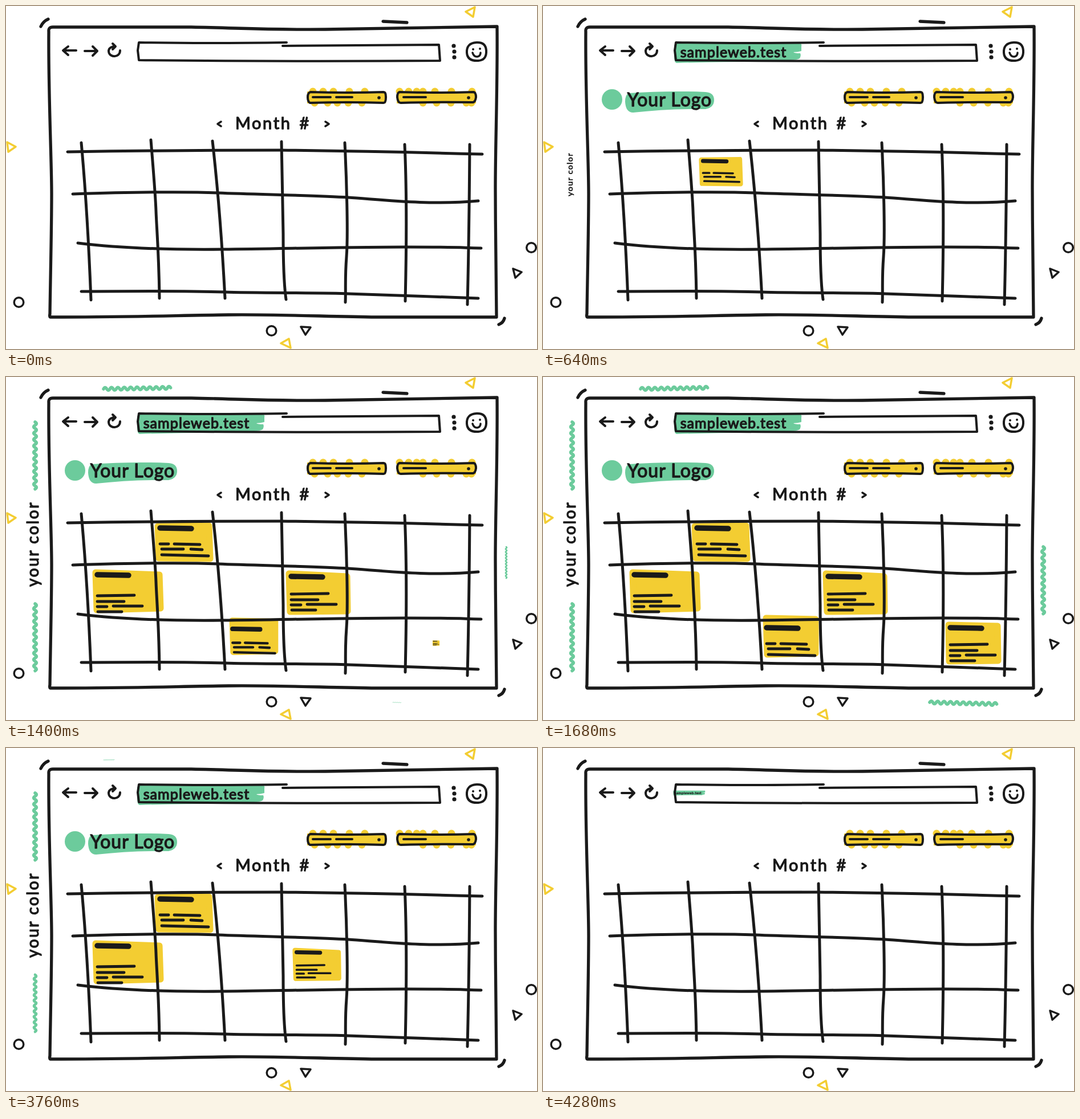
These frames come from a looping animation (931x602 px, 4320 ms). An HTML page:

```html
<!DOCTYPE html>
<html lang="en">
<head>
<meta charset="utf-8">
<title>Calendar sketch</title>
<style>
  html, body { margin: 0; width: 100%; height: 100%; overflow: hidden; background: #fff; }
  svg { display: block; width: 100%; height: 100%; }
  path, circle { fill: none; stroke: #1a1a1a; stroke-width: 4; stroke-linecap: round; stroke-linejoin: round; }
  text { font-family: Lato, "Open Sans", sans-serif; fill: #1a1a1a; stroke: #1a1a1a; stroke-width: 1.3; stroke-linejoin: round; }
  .mid { text-anchor: middle; }
  .green { fill: #6ccb9c; stroke: none; }
  .yellow { fill: #f3cd32; stroke: none; }
  .paper { fill: #f3cd32; stroke: #f3cd32; stroke-width: 11; }
  .wave { stroke: #6ccb9c; stroke-width: 5.5; }
  .head { stroke-width: 9.4; }
  .bars { stroke-width: 4.9; }
  .frame { stroke-width: 5.3; }
  .grid { stroke-width: 5; }
  .thin { stroke-width: 3.5; }
  .gold { stroke: #f3cd32; }
  .dot { fill: #1a1a1a; stroke: none; }
</style>
</head>
<body>
<svg viewBox="0 0 931 602">
  <g id="moving">
    <g data-start="0" data-origin="228 77.7">
      <path class="green" d="M230 69L232 66H451Q454 66 453 71V79Q447 81 439 81Q441 83 451 83Q453 87 450 92Q445 95 434 95V98Q330 97 234 100Q230 99 230 88Z"/>
      <text class="mid" x="334" y="90" font-size="25" letter-spacing="1.1">sampleweb.test</text>
    </g>
    <g data-start="200" data-origin="103 164">
      <circle class="green" cx="121" cy="164" r="18"/>
      <path class="green" d="M150 153Q220 148 285 151Q300 152 300 165Q300 178 285 181Q220 180 158 187Q145 187 144 168Q144 156 150 153Z"/>
      <text class="mid" x="222" y="176" font-size="32" letter-spacing="1">Your Logo</text>
    </g>
    <g data-start="477" data-origin="46 298">
      <text class="mid" transform="translate(57 293) rotate(-90)" font-size="28" letter-spacing="2.6">your color</text>
    </g>
  </g>

  <path class="frame" d="M75 45Q74 37 82 37H325C420 39 470 42 560 41S740 38 861 36C862 140 858 240 858 320S860 490 860 546H650C560 545 480 541 390 542S220 546 78 546Q76 546 77 540C78 470 80 390 80 330S74 150 75 45Z"/>
  <path class="frame" d="M61 36Q65 27 74 23M874 548Q872 556 864 559M661 27L703 29"/>
  <path d="M123 78H101M109 71L100 78L109 86M138 79H160M152 71L160 79L152 87"/>
  <path d="M200 78C200 92 179 91 180 78C181 73 186 71 192 71M187 66L192 71L187 76"/>
  <path d="M492 64Q350 66 233 64L231 78L233 95Q500 98 761 96L759 68Q620 69 485 70"/>
  <path d="M825 64Q841 63 842 78Q843 95 828 96Q809 97 808 82Q807 65 825 64Z"/>
  <path class="thin" d="M818 82Q820 89 826 89Q832 88 832 82"/>

  <g id="bumps"></g>
  <path class="yellow" d="M528 150H666V171H528ZM685 150H824V171H685Z"/>
  <path d="M534 151Q600 153 662 151Q666 151 666 160Q666 170 662 170Q600 168 533 170Q529 168 529 160Q529 152 534 151Z"/>
  <path d="M690 151Q750 153 820 151Q824 152 824 160Q823 168 819 169Q750 168 692 170Q687 170 686 160Q686 152 690 151Z"/>
  <path d="M538 160H569M579 160H607M697 160H736"/>
  <g id="dots"></g>

  <text x="402" y="216" font-size="29" letter-spacing="2.6" word-spacing="4">Month #</text>
  <path class="thin" d="M377 203L371 207L377 211M560 203L566 207L560 211"/>

  <path class="grid" d="M108 256Q300 253 480 253Q650 255 835 260
    M117 330C210 327 300 325 372 328S540 332 600 336S740 350 828 342
    M126 416C190 424 280 428 380 427S600 423 700 423S790 424 833 425
    M132 501C250 500 330 500 383 502S560 503 600 505S760 510 828 513"/>
  <path class="grid" d="M132 240Q143 360 149 516
    M254 235C256 260 262 330 263 360S268 430 269 513
    M362 237C368 290 377 380 384 513
    M483 238L486 400Q486 480 491 515
    M594 240C597 300 600 400 597 440S596 500 595 520
    M699 243Q704 350 700 518
    M813 243Q812 400 809 524"/>

  <path class="thin" d="M889 461L904 467L893 477ZM517 563L534 564L525 577Z"/>
  <path class="thin gold" d="M822 2L806 10L819 19ZM2 239L17 247L4 256ZM482 592L496 584L499 600Z"/>
  <circle class="thin" cx="22.5" cy="520" r="8.3"/>
  <circle class="thin" cx="921" cy="424" r="8.3"/>
  <circle class="thin" cx="465.5" cy="570" r="8.3"/>
</svg>
<script>
const moving = document.getElementById('moving');
const GROW = 320, FORWARD = 1680, BACK = 3480, LOOP = 4320, STEP = 40;

const discs = (id, cls, list) => {
  document.getElementById(id).innerHTML = list
    .map(([x, y, r]) => `<circle class="${cls}" cx="${x}" cy="${y}" r="${r}"/>`).join('');
};
const add = (start, origin, body) => moving.insertAdjacentHTML('beforeend',
  `<g data-start="${start}" data-origin="${origin}">${body}</g>`);

discs('dots', 'dot', [
  [785, 70, 3.6], [786, 80, 3.6], [786, 90, 3.6],
  [819, 76, 2], [831, 75, 2], [654, 161, 2.8], [811, 161, 2.8]
]);
const bumpRows = [
  [150, [538, 556, 574, 602, 629, 690, 706, 720, 731, 752, 781, 817]],
  [170, [541, 564, 581, 600, 624, 731, 755, 780, 807, 816]]
];
discs('bumps', 'yellow', bumpRows.flatMap(([y, xs]) => xs.map(x => [x, y, 6.5])));

// Line patterns, relative to the left end of the header bar
const shortLines = 'M3 28h15m10 0l45 1M6 37h38m13 0l20 1M6 47l82 2';
const longLines = 'M3 37l65 -1M3 47h47M3 56h17m11 -1h51M4 65h42';

function note(start, origin, corners, x, y, lines, drop = 0) {
  add(start, origin, `<path class="paper" d="M${corners}Z"/>
    <path class="head" d="M${x + 3} ${y}l55 1"/>
    <path class="bars" transform="translate(${x} ${y + drop})" d="${lines}"/>`);
}
note(400, '312 293', '266 262L356 261L358 319L268 318', 267, 265, shortLines);
note(640, '213 376', '157 343L269 347L271 406L159 409', 157, 347, longLines);
note(880, '538 384', '496 345L598 350L599 411L498 412', 497, 350, longLines, -6);
note(1120, '434 456', '391 423L478 425L478 485L393 487', 389, 440, shortLines);
note(1360, '754 467', '711 435L797 437L798 498L712 499', 711, 440, longLines, -7);

function wave(start, x, y, angle) {
  add(start, `${x} ${y}`,
    `<path class="wave" transform="translate(${x} ${y}) rotate(${angle})" d="M0 0q2.8 -4.8 5.6 0${'t5.6 0'.repeat(20)}"/>`);
}
wave(660, 51, 79, 90);
wave(848, 51, 398, 90);
wave(1068, 171, 21, -1);
wave(1250, 877, 298, 90);
wave(1360, 678, 571, 1.5);

const parts = [...moving.children].map(el => ({ el, start: +el.dataset.start, origin: el.dataset.origin }));

function draw(now) {
  const t = Math.floor(now % LOOP / STEP) * STEP;
  // Builds up, holds, then runs back at double speed
  const time = t < BACK ? Math.min(t, FORWARD) : FORWARD - 2 * (t - BACK);
  for (const { el, start, origin } of parts) {
    const s = Math.max(0, Math.min(1, (time - start) / GROW));
    const [x, y] = origin.split(' ');
    el.setAttribute('visibility', s ? 'visible' : 'hidden');
    el.setAttribute('transform', `translate(${x} ${y}) scale(${s}) translate(${-x} ${-y})`);
  }
}

let begin;
function tick(now) {
  begin ??= now;
  draw(now - begin);
  requestAnimationFrame(tick);
}
draw(0);
requestAnimationFrame(tick);
</script>
</body>
</html>
```
